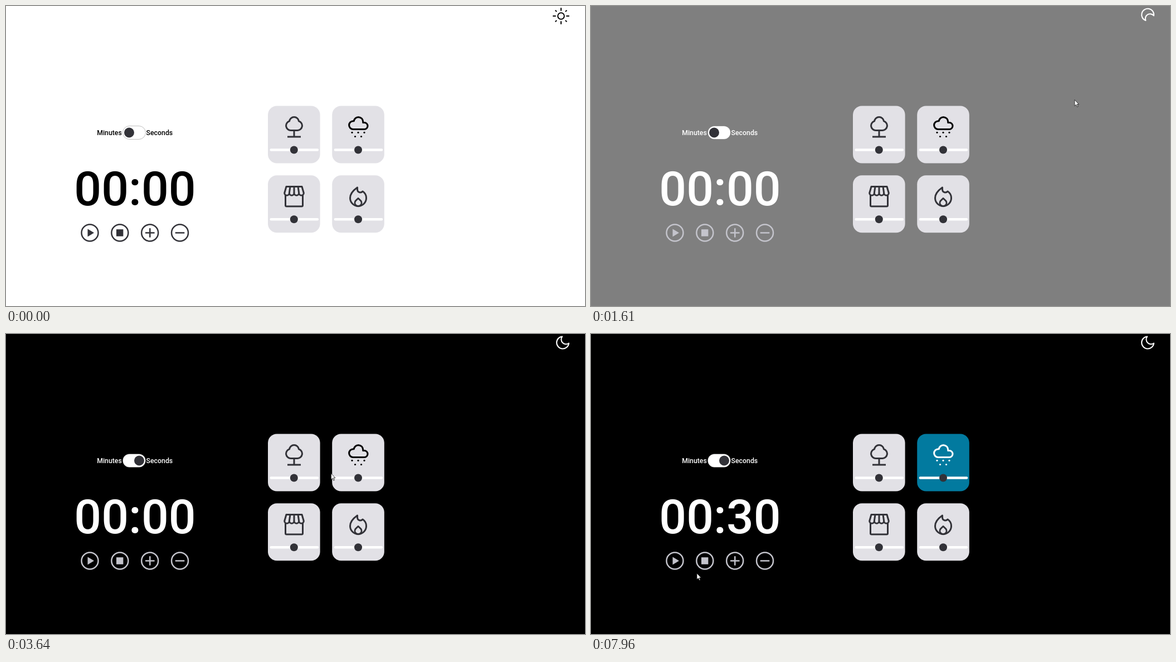
An HTML page that plays this animation: 1039 by 539 pixels, repeating every 8000 ms.

```html
<!DOCTYPE html>
<html lang="en">
<head>
<meta charset="utf-8">
<title>Focus timer</title>
<style>
  html, body { margin: 0; width: 100%; height: 100%; overflow: hidden; }
  svg { display: block; width: 100%; height: 100%; font-family: Roboto, sans-serif; font-weight: 500; }
  .line { fill: none; stroke: currentColor; stroke-width: 3; stroke-linejoin: round; }
  .thin { stroke-width: 2; stroke-linecap: round; }
  .dark { color: #323238; }
  #labels { font-size: 12.3px; }
  #clock { font-size: 86px; text-anchor: middle; }
</style>
</head>
<body>
<svg id="stage" viewBox="0 0 1039 539">
  <g id="sun" class="line thin">
    <circle cx="996" cy="18" r="5.8"/>
    <g id="rays"></g>
  </g>
  <g id="moon" color="#fff">
    <path class="line" style="stroke-width:1.7" transform="translate(984.4 .9) scale(1.22)"
      d="M21 12.8A9 9 0 1 1 11.2 3 7 7 0 0 0 21 12.8z"/>
  </g>

  <g id="text" fill="currentColor">
    <g id="labels">
      <text x="163.2" y="231.5">Minutes</text>
      <text x="251.6" y="231.5">Seconds</text>
    </g>
    <text id="clock" x="231.5" y="358"></text>
  </g>

  <rect x="209.5" y="215.5" width="41" height="24" rx="12" fill="#fff" stroke="#000" stroke-opacity=".25"/>
  <circle id="knob" cy="227.5" r="9" fill="#323238"/>

  <g id="buttons">
    <g id="rings" class="line" style="stroke-width:2.5"></g>
    <path class="line" style="stroke-width:2.5" d="M250 407.5h16.6M258.3 399.2v16.6M303.7 407.5h16.6"/>
    <path fill="currentColor" d="M146.5 400.5l11.5 7-11.5 7zM198 401.3h12.4v12.4h-12.4z"/>
  </g>

  <g id="cards"></g>
  <g class="line dark">
    <g id="tree">
      <path d="M511 223.5A8.5 8.5 0 0 1 508.5 206.9A8.6 8.6 0 0 1 525.5 206.9A8.5 8.5 0 0 1 523 223.5Z"/>
      <path d="M517 223v12M505 235h24"/>
    </g>
    <g id="shop">
      <path id="awning"/>
      <path d="M510 324.5L508.3 336M517 324.5V336M524 324.5L525.7 336"/>
      <path d="M501.5 340V358q0 2 2 2H530.5q2 0 2-2V340"/>
    </g>
    <g id="fire">
      <path d="M630.5 326C622 332 617.5 338.5 617.5 345A14.5 14.5 0 0 0 646.5 345C646.5 340 644 335.5 640 333C637.5 336 630.5 336 630.5 329Z"/>
      <path d="M632 345.5L627.3 350A6 6 0 1 0 636.7 350Z"/>
    </g>
  </g>
  <g id="rain">
    <path class="line" d="M623 221.5A7.4 7.4 0 0 1 623 206.7H624.2A8.3 8.3 0 0 1 640.7 208V209.5H643A6 6 0 0 1 643 221.5Z"/>
    <g id="drops" fill="currentColor"></g>
  </g>

  <g id="cursor" fill="#fff" stroke="#111" stroke-width=".8" stroke-linejoin="round">
    <path id="arrow" d="M0 0V11L2.6 8.7 4.4 12.8 6.1 12 4.4 8.1H7.6Z"/>
    <path id="hand" d="M-1.3 1.2Q0 -.6 1.3 1.2V5Q3 4.4 3.8 5.6Q5.4 5 6 6.4Q8 6 8 8V11.5L6.6 16H-.6L-4 10.4Q-4.4 8.4 -2.6 8.8L-1.3 10.2Z"/>
  </g>
</svg>
<script>
const LOOP = 8000;
const THEME_CLICK = 1100, TOGGLE_CLICK = 2900, RAIN_CLICK = 3900;
const TEN_SECOND_CLICKS = [5630, 5960, 6230];

const CARD = { width: 93.6, height: 103 };
const cards = [0, 1, 2, 3].map(i => ({ x: 470 + 115.2 * (i % 2), y: 179.5 + 124.8 * (i >> 1) }));
const buttons = [0, 1, 2, 3].map(i => ({ x: 150.5 + 53.85 * i, y: 407.5 }));
const discs = [...buttons, { x: 996, y: 18 }];

// The pointer travels along one curve per leg and rests in between.
const entry = [951, 451], sun = [994, 20], toggle = [238, 238], rain = [628, 238], plus = [262, 406], play = [153, 408];
const legs = [
  { start: 190, end: 1000, from: entry, via: [975, 200], to: sun },
  { start: 1185, end: 2150, from: sun, via: [1037, 235], to: toggle },
  { start: 2950, end: 3800, from: toggle, via: [526, 279], to: rain },
  { start: 3980, end: 5090, from: rain, via: [607, 450], to: plus },
  { start: 6280, end: 7200, from: plus, via: [215, 424], to: play },
  { start: 7570, end: 7960, from: play, via: [135, 418], to: [190, 430] }
];

const $ = id => document.getElementById(id);
const clamp = v => Math.min(1, Math.max(0, v));
const progress = (t, start, duration) => clamp((t - start) / duration);
const show = (id, on) => $(id).setAttribute("display", on ? "inline" : "none");
const repeat = (id, count, part) => $(id).innerHTML = Array.from({ length: count }, (_, i) => part(i)).join("");

repeat("rays", 8, i =>
  `<path d="M996 ${i % 2 ? 6.2 : 8}v${i % 2 ? -2 : -4}" transform="rotate(${i * 45} 996 18)"/>`);
repeat("rings", 4, i => `<circle cx="${buttons[i].x}" cy="${buttons[i].y}" r="15"/>`);
repeat("drops", 5, i => `<circle cx="${621 + 5.5 * i}" cy="${i % 2 ? 234.5 : 227.3}" r="1.6"/>`);
repeat("cards", 4, i =>
  `<g transform="translate(${cards[i].x} ${cards[i].y})">
    <rect width="${CARD.width}" height="${CARD.height}" rx="16" fill="#e2e1e6"/>
    <rect x="3.5" y="76.7" width="87.5" height="4.6" rx="2" fill="#fff"/>
    <circle cx="46.8" cy="79" r="7" fill="#323238"/>
  </g>`);
$("awning").setAttribute("d", `M503 324.5H531L534.3 336${"a4.3 4.3 0 0 1-8.65 0".repeat(4)}Z`);
const rainCard = $("cards").children[1].firstElementChild;

// CSS-style cubic-bezier timing: solve x(s) = p by bisection, return y(s).
const bezier = (x1, y1, x2, y2) => p => {
  const curve = (a, b, s) => 3 * a * s * (1 - s) ** 2 + 3 * b * s * s * (1 - s) + s ** 3;
  let low = 0, high = 1;
  for (let i = 0; i < 20; i++) {
    const mid = (low + high) / 2;
    if (curve(x1, x2, mid) < p) low = mid; else high = mid;
  }
  return curve(y1, y2, high);
};
const ease = bezier(.25, .1, .25, 1);
const easeInOut = bezier(.42, 0, .58, 1);

function pointerAt(t) {
  const leg = legs.findLast(l => t >= l.start) || legs[0];
  const u = progress(t, leg.start, leg.end - leg.start);
  return [0, 1].map(k =>
    leg.from[k] * (1 - u) ** 2 + leg.via[k] * 2 * u * (1 - u) + leg.to[k] * u * u);
}

function isClickable(x, y) {
  const inBox = (left, top, width, height) =>
    x > left && x < left + width && y > top && y < top + height;
  return inBox(209, 215, 42, 25)
    || discs.some(d => Math.hypot(x - d.x, y - d.y) < 16)
    || cards.some(c => inBox(c.x + 2, c.y, CARD.width - 2, CARD.height));
}

function draw(t) {
  const night = t >= THEME_CLICK;
  const gray = Math.round(255 * (1 - easeInOut(progress(t, THEME_CLICK, 1020))));
  $("stage").style.background = `rgb(${gray},${gray},${gray})`;
  show("sun", !night);
  show("moon", night);
  $("moon").setAttribute("transform", `rotate(${180 * (1 - ease(progress(t, THEME_CLICK, 2000)))} 999 15.6)`);
  $("text").style.color = night ? "#fff" : "#000";
  $("buttons").style.color = night ? "#c4c4cc" : "#323238";

  $("knob").setAttribute("cx", 221 + 18 * easeInOut(progress(t, TOGGLE_CLICK, 200)));
  $("clock").textContent = `00:${TEN_SECOND_CLICKS.filter(c => t >= c).length}0`;

  const raining = t >= RAIN_CLICK;
  rainCard.setAttribute("fill", raining ? "#027a9f" : "#e2e1e6");
  $("rain").style.color = raining ? "#fff" : "#000";

  const [x, y] = pointerAt(t);
  const over = isClickable(x, y);
  show("cursor", t >= legs[0].start);
  $("cursor").setAttribute("transform", `translate(${x} ${y})`);
  show("hand", over);
  show("arrow", !over);
}

const start = performance.now();
function tick() {
  draw((performance.now() - start) % LOOP);
  requestAnimationFrame(tick);
}
tick();
</script>
</body>
</html>
```
